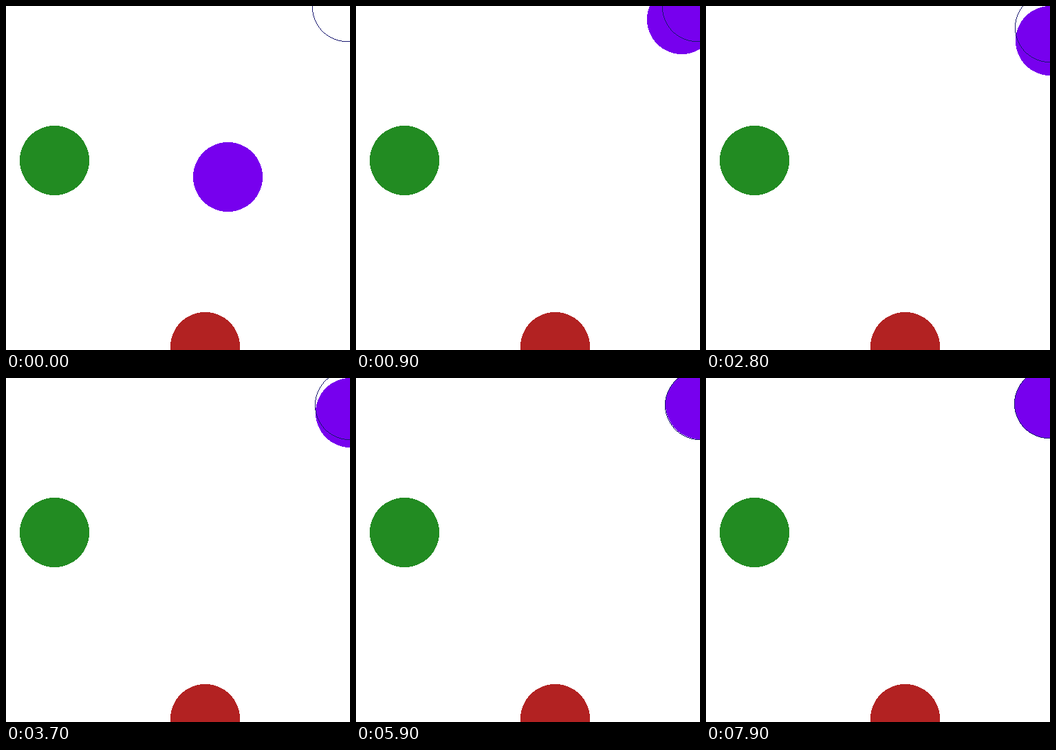
An HTML page with a canvas that plays this animation: 500 by 500 pixels, repeating every 8000 ms.

```html
<!DOCTYPE html>
<html lang="en">
<head>
<meta charset="utf-8">
<title>Ball chasing a ring</title>
<style>
  html, body { margin: 0; width: 100%; height: 100%; overflow: hidden; background: #fff; }
  canvas { display: block; width: 100vw; height: 100vh; image-rendering: pixelated; }
</style>
</head>
<body>
<canvas id="stage" width="500" height="500"></canvas>
<script>
const LOOP = 8000, STEP = 100, RADIUS = 50, WALL = 500;
const ctx = document.getElementById('stage').getContext('2d');

// Progress from 0 to 1 between two moments in seconds
const progress = (t, from, to) => Math.min(1, Math.max(0, (t - from) / (to - from)));

// Filled circle without smoothed edges, row by row
function disc(x, y, color) {
  ctx.fillStyle = color;
  for (let dy = -RADIUS; dy <= RADIUS; dy++) {
    const half = Math.floor(Math.sqrt((RADIUS + 0.5) ** 2 - dy * dy));
    ctx.fillRect(x - half, y + dy, 2 * half + 1, 1);
  }
}

// One-pixel circle, mirrored from a single octant
function outline(x, y, color) {
  ctx.fillStyle = color;
  for (let a = 0; a <= RADIUS * Math.SQRT1_2; a++) {
    const b = Math.round(Math.sqrt(RADIUS * RADIUS - a * a));
    for (const sx of [-1, 1]) {
      for (const sy of [-1, 1]) {
        ctx.fillRect(x + sx * a, y + sy * b, 1, 1);
        ctx.fillRect(x + sx * b, y + sy * a, 1, 1);
      }
    }
  }
}

// The ring is dragged down twice, then slightly back up
function ringAt(t) {
  const first = progress(t, 1.1, 1.7);
  const second = progress(t, 2.9, 3.5);
  const back = progress(t, 7.2, 7.9);
  return [495 + 4 * first - back, 1 + 30 * first + 8 * second - 2 * back];
}

// The ball speeds up into the corner, slides down the wall and settles
function ballAt(t) {
  if (t < 1) {
    const n = t * 10;
    return [322 + 4.87 * n + 1.323 * n * n, 248 - 7.54 * n - 1.989 * n * n];
  }
  const slide = progress(t, 1, 2.8);
  const settle = progress(t, 2.8, 5.9) ** 3;
  const back = progress(t, 7.2, 7.9);
  return [WALL - 2 * back, 50 * slide - 12 * settle - back];
}

function draw(time) {
  const t = Math.floor((time % LOOP) / STEP) * STEP / 1000;
  ctx.fillStyle = '#fff';
  ctx.fillRect(0, 0, 500, 500);
  disc(70, 224, '#228b22');
  disc(289, 495, '#b22222');
  disc(...ballAt(t).map(Math.round), '#7700ee');
  outline(...ringAt(t).map(Math.round), '#191970');
}

const start = performance.now();
function tick() {
  draw(performance.now() - start);
  requestAnimationFrame(tick);
}
tick();
</script>
</body>
</html>
```
